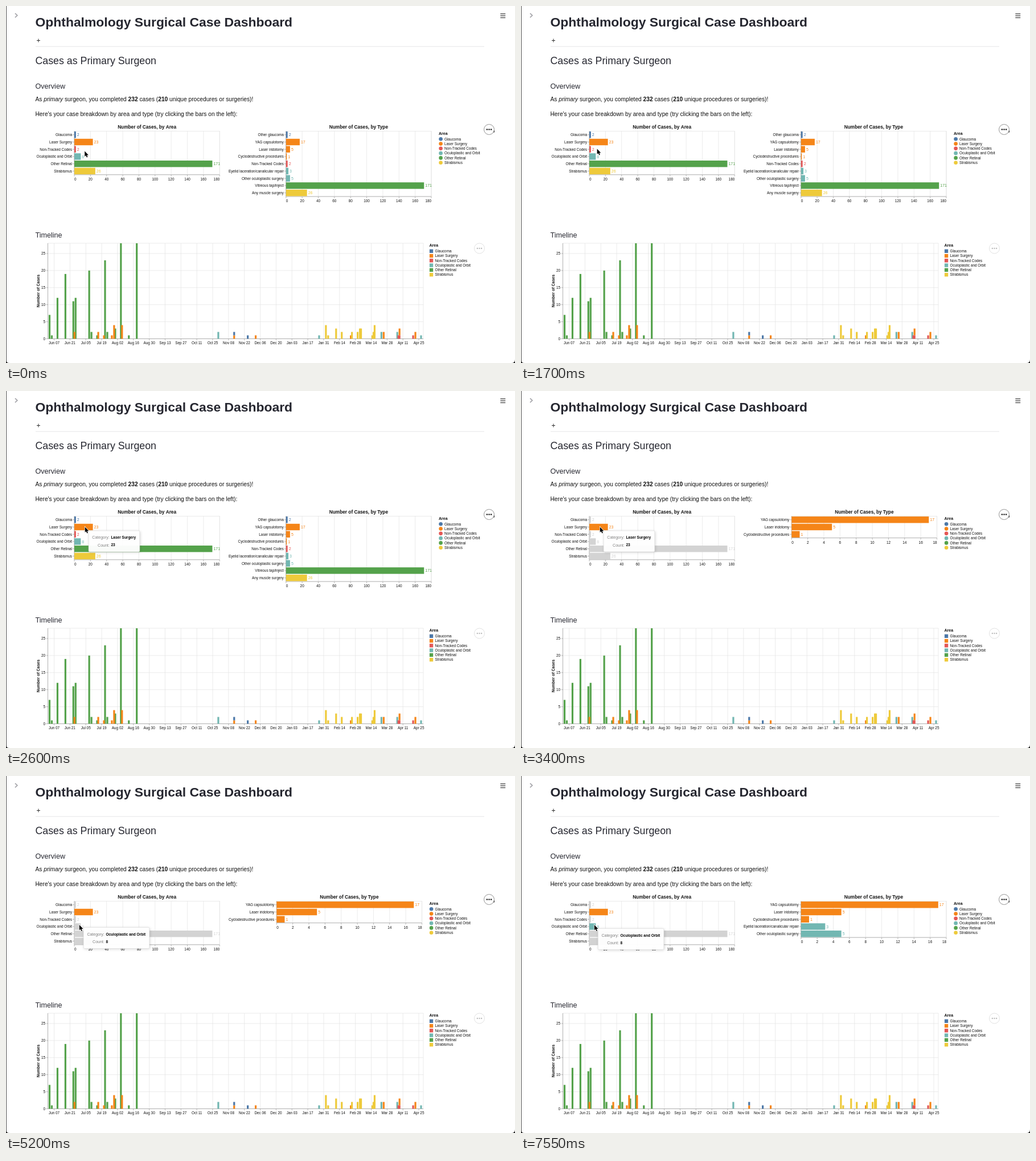
An HTML page with a canvas that plays this animation: 894 by 626 pixels, repeating every 8000 ms.

```html
<!DOCTYPE html>
<html lang="en">
<head>
<meta charset="utf-8">
<title>Surgical Case Dashboard</title>
<style>
  html, body { margin: 0; width: 100%; height: 100%; overflow: hidden; background: #fff; }
  canvas { display: block; }
</style>
</head>
<body>
<canvas id="stage" width="894" height="626"></canvas>
<script>
const ctx = document.getElementById('stage').getContext('2d');
const LOOP = 8000, STEP = 12.74, BAR = 11.4, TOP = 219.4, PLOT_W = 255.2, LEFT_X = 120;
const GREY = '#d3d3d3', GRID = '#e2e2e2', AXIS = '#999';

const COLORS = {
  'Glaucoma': '#4c78a8', 'Laser Surgery': '#f58518', 'Non-Tracked Codes': '#e45756',
  'Oculoplastic and Orbit': '#72b7b2', 'Other Retinal': '#54a24b', 'Strabismus': '#eeca3b'
};
const AREAS = Object.keys(COLORS);
const [GLAUCOMA, LASER, UNTRACKED, OCULO, RETINAL, STRAB] = AREAS;
const AREA_ROWS = [2, 23, 2, 8, 171, 26].map((n, i) => ({ label: AREAS[i], area: AREAS[i], n }));
const TYPE_ROWS = [
  ['Other glaucoma', GLAUCOMA, 2], ['YAG capsulotomy', LASER, 17], ['Laser iridotomy', LASER, 5],
  ['Cyclodestructive procedures', LASER, 1], ['Non-Tracked Codes', UNTRACKED, 2],
  ['Eyelid laceration/canalicular repair', OCULO, 3], ['Other oculoplastic surgery', OCULO, 5],
  ['Vitreous tap/inject', RETINAL, 171], ['Any muscle surgery', STRAB, 26]
].map(([label, area, n]) => ({ label, area, n }));

// Timeline bars per area: [days after Jun 03, count, stack base]
const DAILY = [
  [RETINAL, [[0, 7], [2, 1], [7, 12], [14, 19], [21, 11], [23, 12], [35, 20], [37, 2], [42, 1],
    [49, 23], [51, 2], [58, 3], [63, 28], [70, 1], [77, 28]]],
  [LASER, [[22, 2], [43, 2], [48, 1], [55, 1], [57, 4], [64, 4], [163, 1], [182, 1], [266, 1],
    [295, 2], [309, 2, 1], [323, 2]]],
  [GLAUCOMA, [[163, 1, 1], [175, 1]]],
  [OCULO, [[149, 2], [238, 1], [293, 2], [307, 2], [328, 1]]],
  [UNTRACKED, [[308, 1], [309, 1], [321, 1]]],
  [STRAB, [[244, 4], [246, 1], [253, 3], [258, 2], [267, 2], [272, 2], [274, 3], [275, 3],
    [285, 1], [286, 2], [287, 4]]]
];

// Pointer tip: [ms, x, y]
const PATH = [
  [0, 138.2, 254.5], [250, 138.2, 254.5], [650, 132, 254], [1480, 132, 254], [1700, 133.6, 250.5],
  [2150, 138.5, 245], [2540, 138.5, 245], [2550, 138.7, 238.6], [4480, 138.7, 238.6],
  [4750, 137.3, 242.2], [4800, 136.4, 245], [5200, 128.8, 261], [LOOP, 128.8, 261]
];
const CLICKS = [
  { from: 3100, to: 3350, area: LASER, applied: 3400 },
  { from: 6100, to: 6250, area: OCULO, applied: 6300 }
];

function setFont(size, style = '') {
  ctx.font = `${style} ${size}px "Liberation Sans", Arial, sans-serif`;
}

// y is the middle of the capitals
function text(str, x, y, size, { align = 'left', color = '#111', style = '' } = {}) {
  setFont(size, style);
  ctx.textAlign = align;
  ctx.fillStyle = color;
  ctx.fillText(str, x, y + size * 0.36);
  return ctx.measureText(str).width;
}

function line(x1, y1, x2, y2, color, width = 0.7) {
  ctx.strokeStyle = color;
  ctx.lineWidth = width;
  ctx.beginPath();
  ctx.moveTo(x1, y1);
  ctx.lineTo(x2, y2);
  ctx.stroke();
}

function rect(x, y, w, h, color) {
  ctx.fillStyle = color;
  ctx.fillRect(x, y, w, h);
}

function circle(x, y, r, fill, stroke, width = 1) {
  ctx.beginPath();
  ctx.arc(x, y, r, 0, 2 * Math.PI);
  if (fill) { ctx.fillStyle = fill; ctx.fill(); }
  if (stroke) { ctx.strokeStyle = stroke; ctx.lineWidth = width; ctx.stroke(); }
}

function frame(x, y, w, h) {
  ctx.strokeStyle = GRID;
  ctx.lineWidth = 0.7;
  ctx.strokeRect(x, y, w, h);
  line(x, y, x, y + h, AXIS);
  line(x, y + h, x + w, y + h, AXIS);
}

function barChart(title, rows, x0, max, tick, colorOf) {
  const h = rows.length * STEP, bottom = TOP + h, unit = PLOT_W / max;
  text(title, x0 + PLOT_W / 2, 212.2, 8.28, { align: 'center', style: 'bold' });
  for (let v = 0; v <= max; v += tick) {
    const x = x0 + v * unit, align = v === 0 ? 'left' : v === max ? 'right' : 'center';
    line(x, TOP, x, bottom, GRID);
    line(x, bottom, x, bottom + 3, AXIS);
    text(v, x, bottom + 7.6, 6.37, { align });
  }
  frame(x0, TOP, PLOT_W, h);
  rows.forEach(({ label, area, n }, i) => {
    const y = TOP + (i + 0.5) * STEP, color = colorOf(area);
    line(x0 - 3, y, x0, y, AXIS);
    text(label, x0 - 4, y, 6.37, { align: 'right' });
    rect(x0, y - BAR / 2, n * unit, BAR, color);
    text(n, x0 + n * unit + 2, y, 7, { color });
  });
}

function legend(x, y, round) {
  text('Area', x, y, 7, { style: 'bold' });
  AREAS.forEach((area, i) => {
    const cy = y + 10.3 + i * 8.28;
    if (round) circle(x + 3.6, cy, 3.3, COLORS[area]);
    else rect(x + 0.4, cy - 3.2, 6.3, 6.4, COLORS[area]);
    text(area, x + 10, cy, 6.37);
  });
}

function moreButton(x, y, opacity) {
  ctx.globalAlpha = opacity;
  circle(x, y, 9, '#fff', '#888', 0.9);
  for (const dx of [-3.6, 0, 3.6]) circle(x + dx, y, 1.2, '#111');
  ctx.globalAlpha = 1;
}

function timeline() {
  const x0 = 73.5, x1 = 733, top = 416, base = 583.5, unit = 5.98, day = 1.9893;
  for (let v = 0; v <= 25; v += 5) {
    const y = base - v * unit;
    line(x0, y, x1, y, GRID);
    line(x0 - 3, y, x0, y, AXIS);
    text(v, x0 - 4.5, y, 6.37, { align: 'right' });
  }
  for (let i = 0; i < 24; i++) {
    const x = 84.5 + i * 14 * day, date = new Date(Date.UTC(2020, 5, 7 + i * 14));
    const month = date.toLocaleString('en-US', { month: 'short', timeZone: 'UTC' });
    line(x, top, x, base, GRID);
    line(x, base, x, base + 3, AXIS);
    text(`${month} ${String(date.getUTCDate()).padStart(2, '0')}`, x, 591, 6.37, { align: 'center' });
  }
  frame(x0, top, x1 - x0, base - top);
  for (const [area, bars] of DAILY)
    for (const [d, n, from = 0] of bars)
      rect(74.9 + d * day, base - (from + n) * unit, 3.2, n * unit, COLORS[area]);
  ctx.save();
  ctx.translate(56.3, 499.7);
  ctx.rotate(-Math.PI / 2);
  text('Number of Cases', 0, 0, 7, { align: 'center', style: 'bold' });
  ctx.restore();
  legend(743.5, 419.5, false);
  moreButton(831.5, 425, 0.28);
}

function page() {
  rect(0, 0, 894, 626, '#fff');
  ctx.lineJoin = 'miter';
  ctx.strokeStyle = '#a3a3a8';
  ctx.lineWidth = 1.7;
  ctx.beginPath();
  ctx.moveTo(16, 12.8);
  ctx.lineTo(19.8, 16.5);
  ctx.lineTo(16, 20.2);
  ctx.stroke();
  for (const y of [13.7, 17.1, 20.5]) line(868.3, y, 877.2, y, '#444', 1.3);

  const ink = { color: '#262730' };
  text('Ophthalmology Surgical Case Dashboard', 51.5, 27.6, 22.9, { ...ink, style: 'bold' });
  line(54, 60.5, 60, 60.5, '#333', 1);
  line(57, 57.5, 57, 63.5, '#333', 1);
  line(52, 71, 840, 71, '#e4e4e6', 1);
  text('Cases as Primary Surgeon', 51.5, 95.2, 17.8, ink);
  text('Overview', 51.5, 140.8, 12.6, ink);
  const runs = [['As '], ['primary', 'italic'], [' surgeon, you completed '], ['232', 'bold'],
    [' cases ('], ['210', 'bold'], [' unique procedures or surgeries)!']];
  let x = 51.5;
  for (const [str, style] of runs) x += text(str, x, 163.2, 10.2, { style });
  text("Here's your case breakdown by area and type (try clicking the bars on the left):", 51.5, 189.2, 10.2);
  text('Timeline', 51.5, 401, 12.6, ink);

  rect(0, 0, 1, 626, '#555');
  ctx.fillStyle = '#111';
  for (const [cx, dir] of [[0, 1], [894, -1]]) {
    ctx.beginPath();
    ctx.moveTo(cx, 620);
    ctx.quadraticCurveTo(cx, 626, cx + 6 * dir, 626);
    ctx.lineTo(cx, 626);
    ctx.fill();
  }
}

function pointerAt(t) {
  const i = Math.max(1, PATH.findIndex(p => p[0] >= t));
  const [t0, x0, y0] = PATH[i - 1], [t1, x1, y1] = PATH[i];
  const k = Math.max(0, t - t0) / (t1 - t0);
  return [x0 + (x1 - x0) * k, y0 + (y1 - y0) * k];
}

function tooltip([px, py]) {
  const i = Math.floor((py - TOP) / STEP), row = AREA_ROWS[i];
  if (!row || Math.abs(py - TOP - (i + 0.5) * STEP) > BAR / 2) return;
  if (px > LEFT_X + row.n * PLOT_W / 180) return;
  const x = px + 6.4, y = py + 6.4;
  setFont(6.5, 'bold');
  const w = 46 + ctx.measureText(row.label).width;
  ctx.save();
  ctx.shadowColor = 'rgba(0,0,0,.18)';
  ctx.shadowBlur = 5;
  ctx.shadowOffsetX = ctx.shadowOffsetY = 1;
  ctx.beginPath();
  ctx.roundRect(x, y, w, 37, 2);
  ctx.fillStyle = 'rgba(255,255,255,.97)';
  ctx.fill();
  ctx.restore();
  ctx.strokeStyle = '#ddd';
  ctx.lineWidth = 0.7;
  ctx.stroke();
  [['Category:', row.label], ['Count:', row.n]].forEach(([key, value], k) => {
    const ty = y + 11.9 + k * 13.2;
    text(key, x + 36.6, ty, 7, { align: 'right', color: '#808080' });
    text(value, x + 39.3, ty, 6.5, { style: 'bold', color: '#000' });
  });
}

function pointer([x, y]) {
  const outline = [[0, 0], [0, 9.4], [2.1, 7.5], [3.6, 10.9], [5.2, 10.2], [3.8, 6.9], [6.7, 6.9]];
  ctx.beginPath();
  outline.forEach(([dx, dy]) => ctx.lineTo(x + dx, y + dy));
  ctx.closePath();
  ctx.strokeStyle = '#fff';
  ctx.lineWidth = 1.4;
  ctx.stroke();
  ctx.fillStyle = '#000';
  ctx.fill();
}

function draw(t) {
  const picked = CLICKS.filter(c => t >= c.applied).map(c => c.area);
  const isOn = area => !picked.length || picked.includes(area);
  const rows = TYPE_ROWS.filter(r => isOn(r.area));
  const typeX = picked.length === 1 ? 475.3 : 491.8;
  const [max, tick] = picked.length ? [18, 2] : [180, 20];

  page();
  barChart('Number of Cases, by Area', AREA_ROWS, LEFT_X, 180, 20, a => isOn(a) ? COLORS[a] : GREY);
  barChart('Number of Cases, by Type', rows, typeX, max, tick, a => COLORS[a]);
  legend(typeX + PLOT_W + 13, 223, true);
  rect(855.5, 218, 2.5, 3.5, '#222');
  moreButton(848.5, 216.5, 1);
  timeline();

  const tip = pointerAt(t);
  tooltip(pointerAt(Math.max(0, t - 50)));
  if (CLICKS.some(c => t >= c.from && t < c.to)) circle(...tip, 13.5, null, 'rgba(0,0,0,.6)', 1.6);
  pointer(tip);
}

const start = performance.now();
function loop() {
  draw((performance.now() - start) % LOOP);
  requestAnimationFrame(loop);
}
loop();
</script>
</body>
</html>
```
